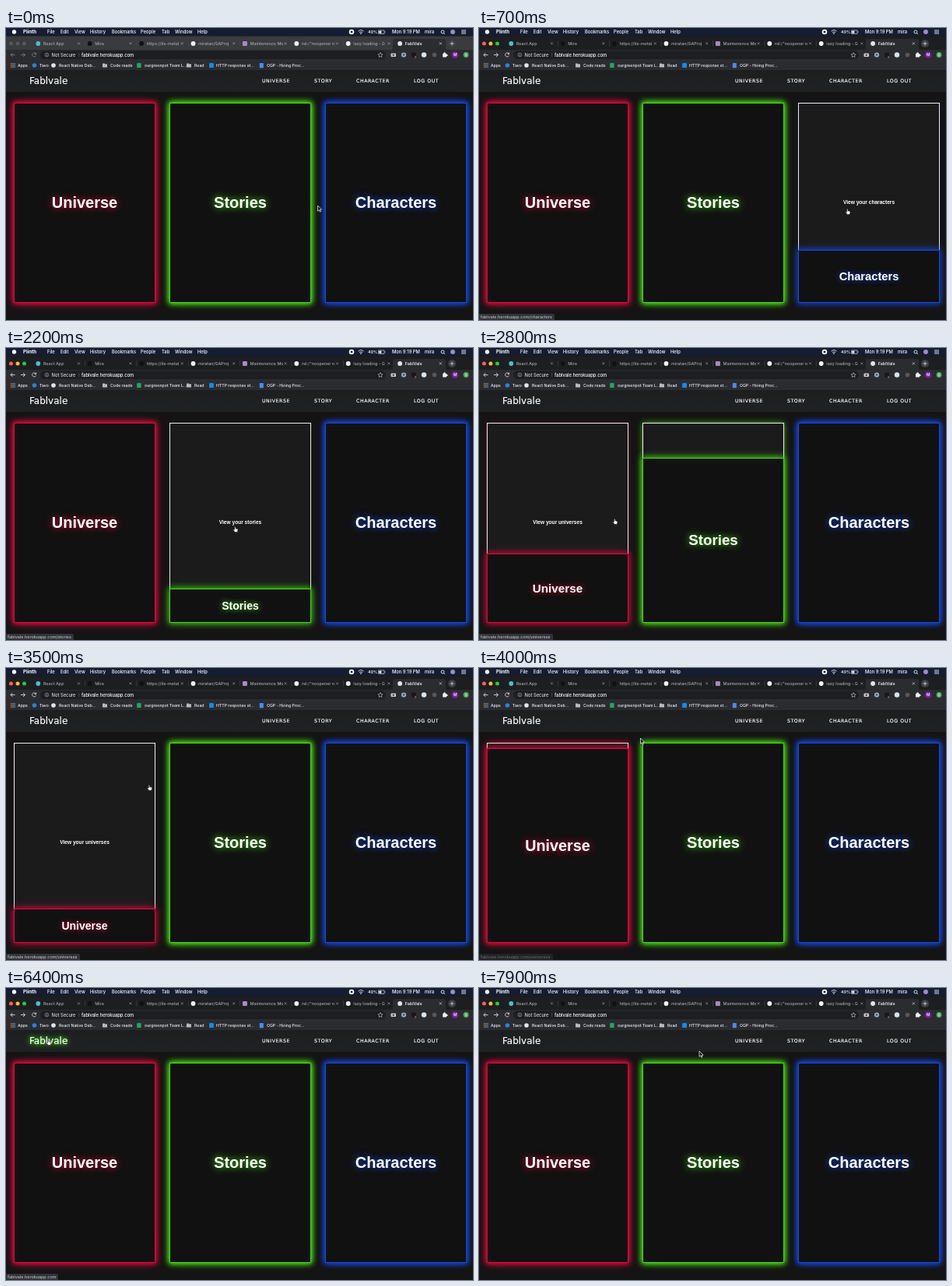
An HTML page that plays this animation: 600 by 375 pixels, repeating every 8000 ms.

```html
<!DOCTYPE html>
<html lang="en">
<head>
<meta charset="utf-8">
<title>FablVale</title>
<style>
html, body { margin: 0; width: 100%; height: 100%; overflow: hidden; background: #151414; }
#stage { position: relative; width: 600px; height: 375px; overflow: hidden; font-family: "Liberation Sans", Arial, sans-serif; }
#stage > * { position: absolute; }
#bar, #pointer { left: 0; top: 0; }
.ui { font-family: Inter, Roboto, sans-serif; font-weight: 500; }
#bar { --strip: #1d1e20; --arrow: #eee; }
#bar.idle { --strip: #3a3b3e; --arrow: #85878b; }
#bar.idle .light { fill: #55575b; }
nav { left: 0; top: 54px; width: 600px; height: 27.5px; background: linear-gradient(#1c1e20, #202124); color: #fff; font: 6.2px/28px "DejaVu Sans", sans-serif; letter-spacing: .58px; -webkit-text-stroke: .15px #fff; }
nav span { position: absolute; white-space: nowrap; }
nav .logo { left: 30px; font-size: 12px; letter-spacing: 0; }
.card { top: 96px; width: 182px; height: 256.5px; box-sizing: border-box; border: 1.2px solid #eee; background: #1b1b1b; color: #fff; font-weight: bold; }
.view { position: absolute; width: 100%; top: 123px; text-align: center; font-size: 6.6px; line-height: 8px; }
.glow { position: absolute; inset: -1.2px; box-shadow: 0 0 7px var(--c); }
.cover { position: absolute; left: -1.2px; right: -1.2px; bottom: -1.2px; box-sizing: border-box; border: 1.3px solid var(--c); background: #111; box-shadow: 0 0 8px 1px var(--c); display: flex; align-items: center; justify-content: center; text-shadow: 0 0 .5em var(--c); }
#status { left: 0; bottom: 0; height: 8.5px; padding: 0 3px 0 2px; background: #323337; border-radius: 0 2px 0 0; color: #b9bcc0; font-size: 5.4px; line-height: 8.5px; white-space: nowrap; }
</style>
</head>
<body>
<div id="stage">
  <svg id="bar" class="ui" width="600" height="54"></svg>
  <nav><span class="logo">Fablvale</span></nav>
  <div id="status" class="ui"></div>
  <svg id="pointer" width="600" height="375">
    <path id="arrow" d="M0 0V7.2L1.7 5.7L2.9 8.2L4 7.7L2.9 5.2H5.1Z" fill="#111" stroke="#fff" stroke-width=".7"/>
    <path id="hand" d="M-1.3 -3.4Q-.6 -4.1 0 -3.3V-1.2L2.5 -.6Q3.2 -.3 3 .6L2.3 3.4H-1L-3 .6Q-2.8 -.5 -1.4 .4Z" fill="#fff" stroke="#111" stroke-width=".6"/>
  </svg>
</div>
<script>
const $ = s => document.querySelector(s);
const HOST = 'fablvale.herokuapp.com';
const RED = [222, 8, 62], GREEN = [70, 220, 18], BLUE = [20, 72, 224];
const rgb = c => `rgb(${c.map(Math.round)})`;

// ---- Browser window ----
const rect = (x, y, w, h, fill, r = 0) => `<rect x="${x}" y="${y}" width="${w}" height="${h}" rx="${r}" fill="${fill}"/>`;
const dot = (x, y, r, fill, cls = '') => `<circle class="${cls}" cx="${x}" cy="${y}" r="${r}" fill="${fill}"/>`;
const line = (d, color = '#c8cacd', w = .8) => `<path d="${d}" fill="none" stroke="${color}" stroke-width="${w}"/>`;
const text = (x, y, s, size = 5.4, fill = '#f0f1f3', weight = 500) =>
  `<text x="${x}" y="${y}" font-size="${size}" fill="${fill}" font-weight="${weight}">${s}</text>`;
const folder = x => rect(x - 3, 45.5, 3, 2, '#b8bbc0', .5) + rect(x - 3, 46.2, 6, 4.3, '#b8bbc0', .5);

function drawBar() {
  const TOOL = '#2b2c2f';
  let s = rect(0, 0, 600, 10.5, '#151d31') + rect(0, 10.5, 600, 18, 'var(--strip)') + rect(0, 28, 600, 26, TOOL);

  s += dot(10.5, 5, 2.7, '#f4f4f4') + text(22, 7.2, 'Plinth', 6.1, '#fff', 700);
  [[53, 'File'], [70, 'Edit'], [88, 'View'], [108, 'History'], [136, 'Bookmarks'], [173, 'People'],
   [200, 'Tab'], [217, 'Window'], [246, 'Help'], [496, 'Mon 9:19 PM'], [538, 'mira']]
    .forEach(([x, label]) => s += text(x, 7.2, label, 5.8, '#fff'));
  s += text(465, 7.1, '49%', 5.4, '#fff');
  s += dot(444, 5, 3.3, '#f4f4f4') + rect(442.7, 3.7, 2.6, 2.6, '#222', .4);
  s += line('M452.5 4.2Q456 1 459.5 4.2M454 5.8Q456 4 458 5.8', '#fff') + dot(456, 7.3, .8, '#fff');
  s += line('M478.5 3H486V7.4H478.5ZM487 4.2V6', '#eee', .6) + rect(479.2, 3.7, 3.2, 3, '#eee');
  s += line('M563 5A2 2 0 1 1 559 5A2 2 0 1 1 563 5M562.4 6.5L564 8', '#fff');
  s += dot(574, 5, 3, '#9a8cc4') + line('M585 3H591M585 5H591M585 7H591', '#fff');

  s += dot(6.5, 20, 2.5, '#ff5f57', 'light') + dot(15, 20, 2.5, '#febc2e', 'light') + dot(23.5, 20, 2.5, '#28c840', 'light');
  s += `<path d="M494 28.2Q497 28 497 25V17Q497 14 500 14H562Q565 14 565 17V25Q565 28 568 28.2Z" fill="${TOOL}"/>`;
  s += '<clipPath id="tab"><rect x="0" y="-8" width="42.5" height="12"/></clipPath>';
  [['React App', '#52b9d0'], ['Mira', '#111'], ['https://its-metal', '#111'],
   ['miratan/GAProj', '#f4f4f4'], ['Maintenence Mo', '#a58cc6'], ['rel="noopener n', '#f4f4f4'],
   ['lazy loading - G', '#f4f4f4'], ['FablVale', '#e3e5e8']].forEach(([label, color], i) => {
    const x = 41.3 + i * 66.4, active = i === 7;
    s += i === 4 ? rect(x - 3, 17, 6, 6, color, 1) : dot(x, 20, 2.9, color);
    s += `<g clip-path="url(#tab)" transform="translate(${x + 6.6} 22)">${text(0, 0, label, 5.4, active ? '#fff' : '#a5a8ad')}</g>`;
    s += line(`M${x + 50.7} 18.4l3 3m0 -3l-3 3`, active ? '#eee' : '#aaa', .6);
    if (i < 6) s += line(`M${x + 60} 16.5v7`, '#4b4c50', .6);
  });
  s += dot(573, 20, 5, '#3f4043') + line('M570.5 20H575.5M573 17.5V22.5', '#ddd');

  s += rect(44, 29.3, 444, 10.6, '#1d1e21', 5.3);
  s += line('M11.5 34.5H6M8.5 32L6 34.5L8.5 37', 'var(--arrow)');
  s += line('M19 34.5H24.5M22 32L24.5 34.5L22 37', 'var(--arrow)');
  s += line('M38.4 33.2A2.5 2.5 0 1 0 38.5 35.4M38.7 31.5V33.5H36.7', 'var(--arrow)');
  s += line('M54.7 34.5A2.3 2.3 0 1 1 50.1 34.5A2.3 2.3 0 1 1 54.7 34.5M52.4 34V36M52.4 32.8V33.4', '#bbb', .6);
  s += text(58.5, 36.6, 'Not Secure', 5.8, '#d5d8dc') + line('M93.7 32V37', '#777', .5) + text(97, 36.6, HOST, 5.8, '#fff');
  s += line('M481 31.5L481.9 33.6L484.1 33.8L482.4 35.3L483 37.5L481 36.3L479 37.5L479.6 35.3L477.9 33.8L480.1 33.6Z', '#ccc', .6);
  s += rect(494.5, 32.5, 6.5, 4.5, '#c9cbce', 1) + dot(497.7, 34.7, 1.2, '#444');
  s += dot(511, 34.5, 3.1, '#8fb5d0') + dot(511, 34.5, 1.4, '#4b5965');
  s += rect(521, 31.5, 6, 6, '#16181c', 1) + text(525, 38.5, '1', 4, '#ddd');
  s += dot(537, 34.5, 3.2, '#d6e3ed') + dot(550.5, 34.5, 2.8, '#54575b');
  s += rect(561, 32.7, 5, 4.8, '#f2f2f2', .7) + dot(563.5, 32.4, 1.2, '#f2f2f2') + dot(566.4, 35, 1.2, '#f2f2f2');
  s += dot(577, 34.5, 4.3, '#7a1fa2') + text(575, 36.3, 'M', 4.8, '#fff');
  s += dot(591, 34.5, 3.4, '#4fae68') + line('M591 32.7V36.3', '#fff', .9);

  for (let i = 0; i < 9; i++)
    s += rect(6 + i % 3 * 2.2, 45 + (i / 3 | 0) * 2.2, 1.5, 1.5, ['#db5b4e', '#61a65c', '#5689dd'][i % 3]);
  s += dot(36.5, 48, 2.8, '#2f7de0') + dot(61, 48, 2.8, '#e4e5e7');
  s += folder(127) + folder(235);
  s += rect(168.2, 45, 5.4, 6, '#23a566', .6) + rect(261, 45, 6, 6, '#1687e8', .8) + rect(325.8, 45, 5, 6.3, '#4b8bf0', .6);
  [[15, 'Apps'], [43, 'Tavo'], [68, 'React Native Deb...'], [134, 'Code reads'], [178, 'ourgreenpot Team L...'],
   [242, 'Read'], [270, 'HTTP response st...'], [335, 'OGP - Hiring Proc...']]
    .forEach(([x, label]) => s += text(x, 50, label, 5.2));
  $('#bar').innerHTML = s;
}
drawBar();

// ---- Page ----
[[329, 'UNIVERSE'], [396, 'STORY'], [450, 'CHARACTER'], [524, 'LOG OUT']].forEach(([x, label]) =>
  $('nav').insertAdjacentHTML('beforeend', `<span style="left:${x}px">${label}</span>`));

const cards = [
  { x: 10, name: 'Universe', path: 'universes', color: RED, from: 2557, to: 3617 },
  { x: 210, name: 'Stories', path: 'stories', color: GREEN, from: 1477, to: 2557 },
  { x: 410, name: 'Characters', path: 'characters', color: BLUE, from: 400, to: 1477 }
];
for (const card of cards) {
  const el = document.createElement('div');
  el.className = 'card';
  el.style.left = card.x + 'px';
  el.style.setProperty('--c', rgb(card.color));
  el.innerHTML = `<div class="glow"></div><div class="view">View your ${card.path}</div><div class="cover">${card.name}</div>`;
  $('#stage').insertBefore(el, $('#status'));
  card.glow = el.firstChild;
  card.cover = el.lastChild;
}

// ---- Motion ----
const LOOP = 8000, STEP = 100, CARD_H = 256.5, DROP = 213, SLIDE = 500, FOCUS = 300;
const logo = { path: '', from: 4600, to: 7250 };
const links = [...cards, logo].sort((a, b) => a.from - b.from);
const clamp = v => Math.max(0, Math.min(1, v));
const mix = (a, b, k) => a + (b - a) * k;

// Cubic Bezier (.25, .1, .25, 1)
function ease(x) {
  let lo = 0, hi = 1;
  for (let i = 0; i < 20; i++) {
    const m = (lo + hi) / 2;
    if (.75 * m * (1 - m) + m ** 3 < x) lo = m; else hi = m;
  }
  return .3 * lo * (1 - lo) ** 2 + 3 * lo * lo * (1 - lo) + lo ** 3;
}

const path = [
  [0, 400.5, 228], [250, 403, 230], [400, 412, 232], [700, 474, 236], [1250, 466, 238], [1477, 398, 238],
  [1600, 351, 238], [1800, 315, 237], [2300, 290, 232], [2557, 198, 225], [2800, 175, 223], [3350, 170, 210],
  [3617, 196, 110], [4000, 207.5, 90], [4200, 185, 87], [4600, 76, 73], [5000, 55, 70], [6900, 55, 70],
  [7250, 84, 76], [7700, 260, 83], [7900, 283, 81], [8000, 283, 81]
];
function pointerAt(t) {
  const i = path.findIndex(p => p[0] > t), a = path[i - 1], b = path[i];
  const k = (t - a[0]) / (b[0] - a[0]);
  return [mix(a[1], b[1], k), mix(a[2], b[2], k)];
}

function logoGlow(t) {
  const alpha = clamp((t - logo.from) / 250) * (t < logo.to);
  const phase = clamp((t - 5000) / 1400), blue = clamp((t - 6400) / 1400);
  const c = RED.map((v, i) => Math.round(mix(mix(v, GREEN[i], phase), BLUE[i], blue)));
  const color = `rgba(${c},${alpha})`;
  return `0 0 5px ${color}, 0 0 9px ${color}`;
}

function draw(t) {
  $('#bar').classList.toggle('idle', t < FOCUS);
  for (const { glow, cover, from, to } of cards) {
    const open = ease(clamp((t - from) / SLIDE)) - ease(clamp((t - to) / SLIDE));
    glow.style.opacity = 1 - open;
    cover.style.height = CARD_H - DROP * open + 'px';
    cover.style.fontSize = 20 * (1 - .3 * open) + 'px';
  }
  $('.logo').style.textShadow = logoGlow(t);

  const link = links.filter(l => l.from <= t).pop();
  const status = $('#status');
  status.style.opacity = link ? 1 - clamp((t - link.to - 250) / 250) : 0;
  status.textContent = link ? HOST + (link.path && '/' + link.path) : '';

  const over = link && t < link.to;
  const at = `translate(${pointerAt(t)})`;
  $('#hand').setAttribute('transform', at);
  $('#arrow').setAttribute('transform', at);
  $('#hand').style.display = over ? '' : 'none';
  $('#arrow').style.display = over ? 'none' : '';
}

const start = performance.now();
function tick() {
  const t = (performance.now() - start) % LOOP;
  draw(Math.floor(t / STEP) * STEP);
  requestAnimationFrame(tick);
}
tick();
</script>
</body>
</html>
```
